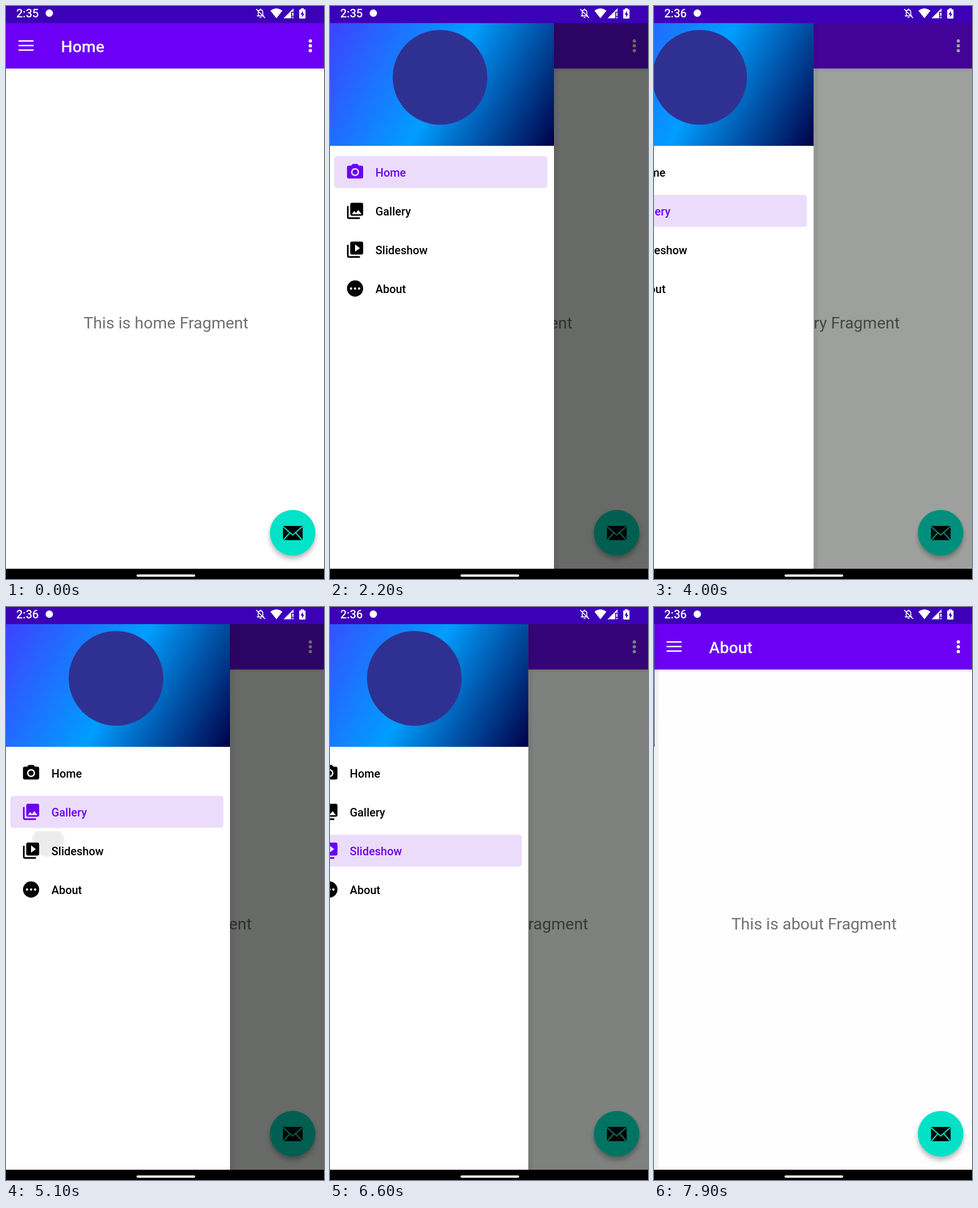
Write an HTML page that moves like this. It is 558 px wide and 1004 px high and loops after 8 s.

```html
<!DOCTYPE html>
<html lang="en">
<head>
<meta charset="utf-8">
<style>
  html, body { margin: 0; width: 100%; height: 100%; overflow: hidden; background: #fff; }
  svg { display: block; width: 558px; height: 1004px; font-family: Roboto, sans-serif; }
  .medium { font-weight: 500; }
</style>
</head>
<body>
<svg viewBox="0 0 558 1004">
  <defs>
    <linearGradient id="head" gradientUnits="userSpaceOnUse" x1="0" y1="30" x2="393" y2="245">
      <stop offset="0" stop-color="#3d42ff"/>
      <stop offset=".5" stop-color="#009eff"/>
      <stop offset="1" stop-color="#000048"/>
    </linearGradient>
    <linearGradient id="barShade" x2="0" y2="1">
      <stop stop-opacity=".09"/><stop offset="1" stop-opacity="0"/>
    </linearGradient>
    <linearGradient id="edge">
      <stop stop-opacity=".07"/><stop offset=".8" stop-opacity=".04"/><stop offset="1" stop-opacity="0"/>
    </linearGradient>
    <filter id="soft" x="-30%" y="-30%" width="160%" height="160%"><feGaussianBlur stdDeviation="4"/></filter>
    <filter id="feather"><feGaussianBlur stdDeviation="1.5"/></filter>
    <clipPath id="row"><rect id="rowBox" width="393" height="68"/></clipPath>
  </defs>

  <!-- page -->
  <rect width="558" height="1004" fill="#fff"/>
  <g font-size="28.4" fill="#6f7170" text-anchor="middle">
    <text id="oldText" x="280.7" y="565"/>
    <text id="newText" x="280.7" y="565"/>
  </g>
  <rect y="109" width="558" height="6" fill="url(#barShade)"/>
  <rect y="30" width="558" height="79.5" fill="#6c00f6"/>
  <path d="M22 61.2h26.5M22 69.2h26.5M22 77.2h26.5" stroke="#fff" stroke-width="2.6"/>
  <text id="title" class="medium" x="96.5" y="81" font-size="28.4" fill="#fff"/>
  <g fill="#fff">
    <circle cx="534" cy="61.2" r="2.9"/><circle cx="534" cy="69.7" r="2.9"/><circle cx="534" cy="78.2" r="2.9"/>
  </g>
  <circle cx="503" cy="929" r="40" opacity=".28" filter="url(#soft)"/>
  <circle cx="503" cy="923" r="40" fill="#00e3c9"/>
  <rect x="486" y="911" width="34.5" height="25" rx="2"/>
  <path d="M486.500 912.500L503 927L519.500 912.500M487 935.500L498 923M519.500 935.500L508.500 923" fill="none" stroke="#00e3c9" stroke-width="2"/>

  <rect id="scrim" y="30" width="558" height="956" fill="#020802"/>

  <g id="drawer">
    <rect id="shade" x="393" y="30" width="9" height="956" fill="url(#edge)"/>
    <rect y="30" width="393" height="956" fill="#fff"/>
    <rect y="30" width="393" height="215" fill="url(#head)"/>
    <circle cx="193" cy="125" r="83" fill="#2e3192"/>
    <rect id="mark" x="7.500" width="374" height="56" rx="5" fill="#ecdcfc"/>
    <g clip-path="url(#row)"><circle id="ripple" cx="74" fill="#001400" filter="url(#feather)"/></g>
    <g id="menu" class="medium" font-size="19.900"></g>
  </g>

  <!-- system bars -->
  <rect width="558" height="30" fill="#3c00b7"/>
  <g fill="#fff">
    <text id="clock" class="medium" x="18" y="20" font-size="20"/>
    <circle cx="76" cy="12.500" r="6.500"/>
    <path d="M464 8.300Q474.500 0 485 8.300L474.500 21.500z"/>
    <path d="M487 21.500L504.500 4V10H500.500V21.500zM502.300 11.500h2.200v6h-2.200zM502.300 19.300h2.200v2.200h-2.200z"/>
    <path d="M517.500 4h5v2h2q1 0 1 1v14q0 1-1 1h-9q-1 0-1-1V7q0-1 1-1h2z"/>
  </g>
  <path d="M521 8.500l-4 6.500h2.500v5l4-6.500h-2.500z" fill="#3c00b7"/>
  <g transform="translate(437 3) scale(.8)" fill="none" stroke="#fff" stroke-width="2">
    <path d="M7 17V10Q7 5 12 4.500Q17 5 17 10V17M4 18H20M10 21.500H14M12 2V5M2.500 3L22 22.500"/>
  </g>
  <rect y="986" width="558" height="18"/>
  <rect x="229" y="996" width="103" height="4" rx="2" fill="#fff"/>
</svg>

<script>
const LOOP = 8000, STEP = 100, WIDTH = 393, SETTLE = 512, FADE = 220, SCRIM_LAG = 18;
const $ = id => document.getElementById(id);
const set = (id, attrs) => { for (const k in attrs) $(id).setAttribute(k, attrs[k]); };
const clamp = x => Math.min(1, Math.max(0, x));

// Icons on a 24-unit grid
const pages = [
  ["Home", "M9 2L7.17 4H4c-1.1 0-2 .9-2 2v12c0 1.1.9 2 2 2h16c1.1 0 2-.9 2-2V6c0-1.1-.9-2-2-2h-3.17L15 2zM12 17a5 5 0 1 1 0-10 5 5 0 0 1 0 10zM12 8.8a3.200 3.200 0 1 0 0 6.400 3.200 3.200 0 0 0 0-6.400z"],
  ["Gallery", "M22 16V4c0-1.1-.9-2-2-2H8c-1.1 0-2 .9-2 2v12c0 1.1.9 2 2 2h12c1.1 0 2-.9 2-2zm-11-4l2.03 2.71L16 11l4 5H8zM2 6v14c0 1.1.9 2 2 2h14v-2H4V6z"],
  ["Slideshow", "M4 6H2v14c0 1.1.9 2 2 2h14v-2H4zM20 2H8c-1.1 0-2 .9-2 2v12c0 1.1.9 2 2 2h12c1.1 0 2-.9 2-2V4c0-1.1-.9-2-2-2zm-8 12.5v-9l6 4.5z"],
  ["About", "M12 2a10 10 0 1 0 0 20 10 10 0 0 0 0-20z" +
    [7, 12, 17].map(x => `M${x} 10.5a1.500 1.500 0 1 1 0 3 1.500 1.500 0 0 1 0-3z`).join("")]
];
// Each visit: drawer opens, an item is pressed, the drawer closes
const visits = [
  { open: 1406, press: 2290, close: 2483, y: 350 },
  { open: 3887, press: 5060, close: 5190, y: 410 },
  { open: 6420, press: 7530, close: 7535, y: 488 }
];

$("menu").innerHTML = pages.map(([name, icon], i) => `<g>
  <path d="${icon}" fill-rule="evenodd" transform="translate(27 ${274 + 68 * i}) scale(1.417)"/>
  <text x="79.8" y="${298.500 + 68 * i}">${name}</text></g>`).join("");
const items = [...$("menu").children];

const settle = ms => 1 - (1 - clamp(ms / SETTLE)) ** 5;
const openness = t => visits.reduce((sum, v) => sum + settle(t - v.open) - settle(t - v.close), 0);
const sentence = i => `This is ${pages[i][0].toLowerCase()} Fragment`;

function draw(t) {
  const page = visits.filter(v => t >= v.close).length;
  const amount = openness(t);
  const fade = page ? clamp((t - visits[page - 1].close) / FADE) : 1;

  $("clock").textContent = t < 2500 ? "2:35" : "2:36";
  $("title").textContent = pages[page][0];
  $("newText").textContent = sentence(page);
  $("oldText").textContent = sentence(Math.max(0, page - 1));
  set("newText", { opacity: fade });
  set("oldText", { opacity: 1 - fade });

  set("scrim", { opacity: .6 * openness(t - SCRIM_LAG) });
  set("drawer", { transform: `translate(${WIDTH * (amount - 1)} 0)` });
  set("shade", { opacity: amount > .0005 ? 1 : 0 });
  set("mark", { y: 263 + 68 * page });
  items.forEach((g, i) => g.setAttribute("fill", i === page ? "#6a00f0" : "#000"));

  const i = visits.findIndex(v => t >= v.press && t < v.close + 200);
  if (i >= 0) {
    const v = visits[i], spread = Math.max(0, t - v.close);
    set("rowBox", { y: 325 + 68 * i });
    set("ripple", { cy: v.y, r: 28 + 1.5 * spread, opacity: .075 * (1 - spread / 200) });
  } else set("ripple", { opacity: 0 });
}

let start;
function tick(now) {
  start ??= now;
  draw(Math.floor((now - start) % LOOP / STEP) * STEP);
  requestAnimationFrame(tick);
}
draw(0);
requestAnimationFrame(tick);
</script>
</body>
</html>
```
